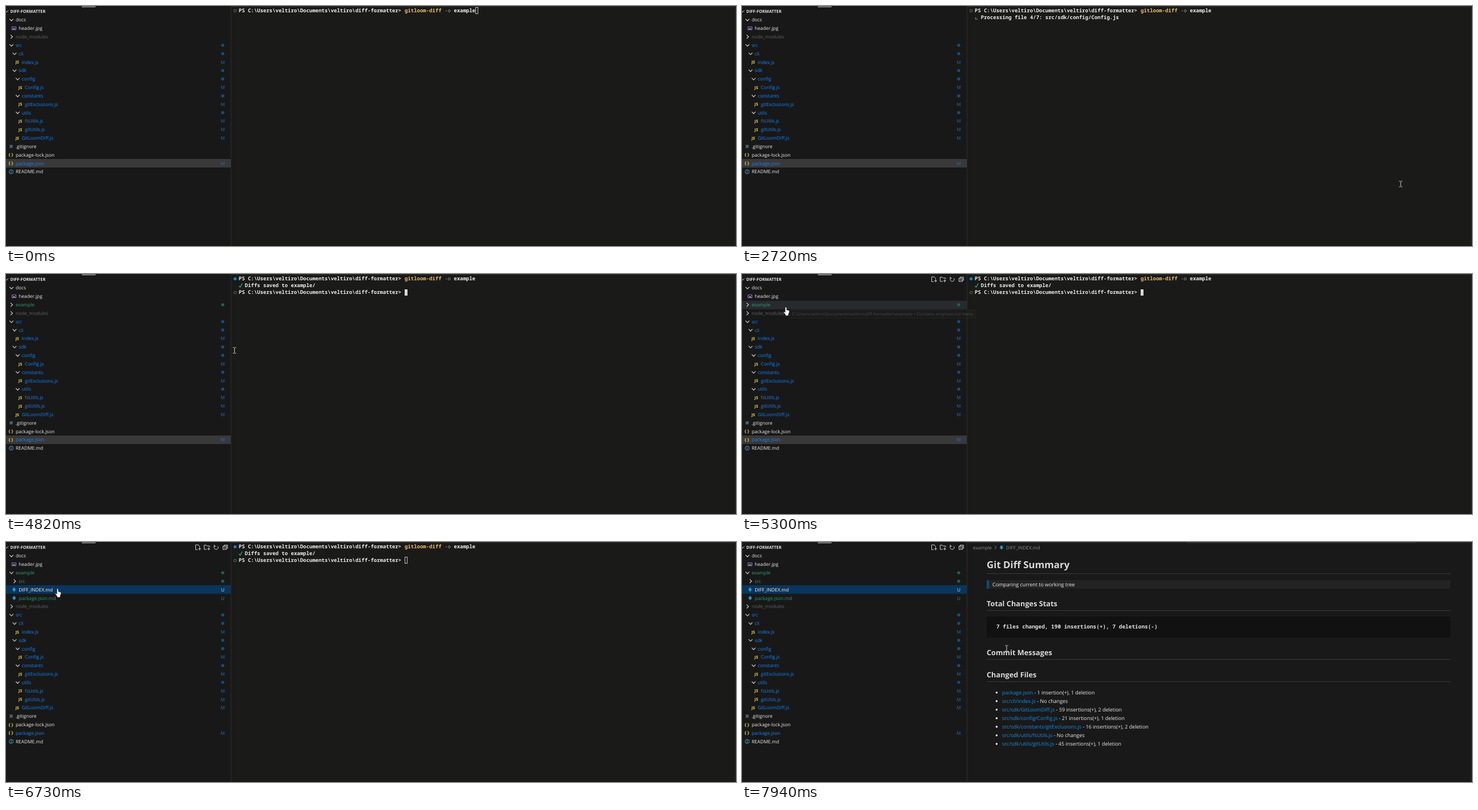
An HTML page with a canvas that plays this animation: 1280 by 422 pixels, repeating every 8 s.

```html
<!DOCTYPE html>
<html lang="en">
<head>
<meta charset="utf-8">
<title>Diff formatter demo</title>
<style>
html, body { margin: 0; width: 100%; height: 100%; overflow: hidden; background: #181818; }
canvas { display: block; }
</style>
</head>
<body>
<canvas id="stage" width="1280" height="422"></canvas>
<script>
const ctx = document.getElementById('stage').getContext('2d');
const LOOP = 8000;
const ROW = 14.83, TREE_TOP = 17, SIDE = 394;
const CELL = 5.39, TERM_X = 408;
const UI = '"Open Sans", "Noto Sans", sans-serif';
const MONO = '"Noto Sans Mono", "DejaVu Sans Mono", monospace';
const UI_SIZE = 8.3, BODY_SIZE = 8.95;
const BLUE = '#1585fa', LINK = '#1190ea', GREEN = '#2c9c78', WHITE = '#ededed', GREY = '#626262';
const HOME = 'C:\\Users\\veltiro\\Documents\\veltiro\\diff-formatter';

// Moments of the story, in ms
const T = {
  focus: 640, enter: 1910, run: 2180, folder: 2920, saved: 3060, prompt: 3130,
  tracked: 4530, tip: 5300, expand: 5440, tip2: 6590, select: 6730, open: 6810, render: 6900
};
// start, end, steps, from x, y, to x, y
const MOVES = [
  [240, 710, 7, 1213, 379, 1155, 313],
  [4320, 5100, 12, 1154, 312, 77, 58],
  [5900, 6330, 7, 78, 60, 90.5, 82],
  [7400, 7670, 5, 160, 100, 451, 172],
  [7870, 7940, 2, 457, 179, 464, 187]
];
const JOBS = [
  [2180, 'package.json'], [2330, 'src/cli/index.js'], [2530, 'src/sdk/GitLoomDiff.js'],
  [2720, 'src/sdk/config/Config.js'], [2850, 'src/sdk/constants/gitExclusions.js'],
  [2920, 'src/sdk/utils/fsUtils.js'], [2990, 'src/sdk/utils/gitUtils.js']
];
const CHANGES = [
  '1 insertion(+), 1 deletion', 'No changes', '59 insertions(+), 2 deletion',
  '21 insertions(+), 1 deletion', '16 insertions(+), 2 deletion', 'No changes',
  '45 insertions(+), 1 deletion'
];
const HAND = new Path2D('M-1.3 1Q0 -0.9 1.3 1L1.3 5 5 6Q6.4 6.6 6 9L4.6 12.4 4.4 15.3H-.6L-.9 13.4-4 9.6Q-4.1 8-2.7 8.4L-1.3 9.6Z');
const ARROW = new Path2D('M-1.9-3.6L0-2.6 1.9-3.6V-.2H3.6L0 3.7-3.6-.2H-1.9Z');

function rect(x, y, w, h, color) {
  ctx.fillStyle = color;
  ctx.fillRect(x, y, w, h);
}
function text(str, x, y, size, color, weight = 500, family = UI) {
  ctx.font = `${weight} ${size}px ${family}`;
  ctx.fillStyle = color;
  ctx.fillText(str, x, y);
  return x + ctx.measureText(str).width;
}
function line(points, color, width = 1) {
  ctx.beginPath();
  for (let i = 0; i < points.length; i += 2) ctx.lineTo(points[i], points[i + 1]);
  ctx.strokeStyle = color;
  ctx.lineWidth = width;
  ctx.stroke();
}
function disc(x, y, r, color, hollow) {
  ctx.beginPath();
  ctx.arc(x, y, r, 0, Math.PI * 2);
  ctx.lineWidth = 1;
  ctx.fillStyle = ctx.strokeStyle = color;
  if (hollow) ctx.stroke(); else ctx.fill();
}
function box(x, y, w, h, color) {
  ctx.strokeStyle = color;
  ctx.lineWidth = 1;
  ctx.strokeRect(x, y, w, h);
}
function shape(path, x, y, fill, outline) {
  ctx.save();
  ctx.translate(x, y);
  ctx.fillStyle = fill;
  ctx.fill(path);
  if (outline) {
    ctx.strokeStyle = outline;
    ctx.lineWidth = 0.7;
    ctx.stroke(path);
  }
  ctx.restore();
}

function mouseAt(t) {
  const move = MOVES.filter(m => m[0] <= t).pop();
  if (!move) return null;
  const [start, end, steps, x0, y0, x1, y1] = move;
  const k = Math.min(steps - 1, Math.floor((t - start) / (end - start) * (steps - 1) + 0.01));
  const p = k / (steps - 1), e = p * p * (3 - 2 * p);
  return { x: x0 + (x1 - x0) * e, y: y0 + (y1 - y0) * e };
}

// Each row: depth, name, kind, status
function treeRows(t) {
  const open = t >= T.expand;
  const rows = [[0, 'docs', 'open', ''], [1, 'header.jpg', 'image', '']];
  if (t >= T.folder) rows.push([0, 'example', open ? 'open' : 'shut', t >= T.tracked ? 'U' : '']);
  if (open) rows.push([1, 'src', 'shut', 'U'], [1, 'DIFF_INDEX.md', 'md', 'U'], [1, 'package.json.md', 'md', 'U']);
  rows.push(
    [0, 'node_modules', 'shut', 'ignored'],
    [0, 'src', 'open', 'M'], [1, 'cli', 'open', 'M'], [2, 'index.js', 'js', 'M'],
    [1, 'sdk', 'open', 'M'], [2, 'config', 'open', 'M'], [3, 'Config.js', 'js', 'M'],
    [2, 'constants', 'open', 'M'], [3, 'gitExclusions.js', 'js', 'M'],
    [2, 'utils', 'open', 'M'], [3, 'fsUtils.js', 'js', 'M'], [3, 'gitUtils.js', 'js', 'M'],
    [2, 'GitLoomDiff.js', 'js', 'M'], [0, '.gitignore', 'git', ''],
    [0, 'package-lock.json', 'json', ''], [0, 'package.json', 'json', 'M'], [0, 'README.md', 'info', '']
  );
  return rows;
}

function rowIcon(kind, x, y) {
  if (kind === 'open') line([x - 3.3, y - 1.6, x, y + 1.8, x + 3.3, y - 1.6], '#dcdcdc', 1.1);
  if (kind === 'shut') line([x - 1.5, y - 3.3, x + 1.9, y, x - 1.5, y + 3.3], '#dcdcdc', 1.1);
  if (kind === 'js') text('JS', x - 3.7, y + 2.7, 6.9, '#f2dc4c', 700);
  if (kind === 'json') text('{ }', x - 5, y + 2.5, 7.6, '#ead445', 700);
  if (kind === 'md') shape(ARROW, x - 0.8, y, '#259bd0');
  if (kind === 'git') rect(x - 3.2, y - 2.7, 5.4, 5.4, '#4a5d67');
  if (kind === 'image') {
    box(x - 4.5, y - 2.5, 7, 5, '#9a7cc4');
    rect(x - 3, y, 4, 2, '#ab8ad2');
  }
  if (kind === 'info') {
    disc(x - 0.5, y, 3.6, '#42a0da', true);
    rect(x - 1, y - 0.8, 1, 2.8, '#52b0e8');
    rect(x - 1, y - 2.3, 1, 1, '#52b0e8');
  }
}

function drawTree(t, mouse) {
  const rows = treeRows(t);
  const picked = t >= T.select ? 'DIFF_INDEX.md' : t >= T.expand ? 'example' : 'package.json';
  const hover = mouse && mouse.x < SIDE ? Math.floor((mouse.y - TREE_TOP) / ROW) : -1;
  rows.forEach(([depth, name, kind, status], i) => {
    const top = TREE_TOP + i * ROW, mid = top + ROW / 2;
    const active = name === picked && t >= T.expand;
    if (active) {
      rect(0, Math.round(top), SIDE, 15, '#0a355c');
      if (t < T.select) box(0.5, Math.round(top) + 0.5, SIDE - 1, 14, '#0d4577');
    } else if (name === picked) rect(0, Math.round(top), SIDE, 15, '#39393a');
    else if (i === hover) rect(0, Math.round(top), SIDE, 15, '#282a2b');

    const x = 9.6 + depth * 5.4;
    rowIcon(kind, x, mid);
    const tint = { M: BLUE, U: GREEN, ignored: GREY }[status] || WHITE;
    text(name, x + 7.3, mid + 3, UI_SIZE, active ? '#f4f4f4' : tint);
    if (status !== 'M' && status !== 'U') return;
    if (kind === 'open' || kind === 'shut') {
      disc(380, mid, 2.7, active ? '#7590bd' : status === 'M' ? '#104e88' : '#1e6450');
    } else {
      ctx.textAlign = 'center';
      text(status, 380, mid + 3, UI_SIZE, active ? '#d0dce6' : status === 'M' ? '#0f72c0' : GREEN);
      ctx.textAlign = 'left';
    }
  });
}

function drawHeader(showTools) {
  line([-1, 9, 1, 11, 4, 7.6], '#d0d0d0');
  text('DIFF-FORMATTER', 7.5, 12, 7.3, '#e4e4e4', 700);
  rect(133, 1, 24, 1, '#d8d8d8');
  if (!showTools) return;
  const c = '#d0d0d0';
  line([336, 13.5, 332.5, 13.5, 332.5, 5, 337, 5, 339.5, 7.5, 339.5, 9], c);
  line([337, 12, 342, 12], c);
  line([339.5, 9.5, 339.5, 14.5], c);
  line([352, 13, 347.5, 13, 347.5, 5.5, 351, 5.5, 352.5, 7, 357, 7, 357, 9], c);
  line([353, 12, 358, 12], c);
  line([355.5, 9.5, 355.5, 14.5], c);
  ctx.beginPath();
  ctx.arc(368.5, 9.5, 3.6, -0.6, Math.PI * 1.3);
  ctx.strokeStyle = c;
  ctx.stroke();
  line([365, 4.8, 365, 7.4, 367.8, 7.4], c);
  line([382.5, 7, 382.5, 5.5, 388.5, 5.5, 388.5, 11, 387, 11], c);
  box(380.5, 7.5, 6, 5.5, c);
  line([382, 10.3, 385, 10.3], c);
}

function term(str, col, row, color) {
  text(str, TERM_X + col * CELL, 11.2 + row * 12.1, CELL / 0.6, color, 600, MONO);
}
function prompt(row) {
  term(`PS ${HOME}>`, 0, row, WHITE);
}
function cursor(col, row, solid) {
  const x = Math.round(TERM_X + col * CELL), y = 3 + row * 12;
  if (solid) rect(x, y, 5, 11, '#d8d8d8');
  else box(x + 0.5, y - 0.5, 4, 11, '#bcbcbc');
}
function spinner(t) {
  const step = Math.floor((t - T.run) / 80);
  const ring = [[0, 0], [1, 0], [1, 1], [1, 2], [0, 2], [0, 1]];
  for (let i = 0; i < 3; i++) {
    const [cx, cy] = ring[(step + 3 + i) % 6];
    rect(409 + cx * 2.6, 17.8 + cy * 2.4, 1.3, 1.3, '#bcc4c4');
  }
}

function drawTerminal(t) {
  prompt(0);
  term('gitloom-diff', 54, 0, '#f2bc60');
  term('-o', 67, 0, '#707070');
  term('example', 70, 0, WHITE);
  if (t >= T.prompt) disc(401.7, 8.4, 2.7, '#1b7fc0');
  else disc(401.7, 8.4, 2.3, '#6c6c6c', true);

  if (t < T.enter) cursor(77, 0, t >= T.focus);
  else if (t < T.run) cursor(0, 1, true);
  else if (t < T.saved) {
    const done = JOBS.filter(j => j[0] <= t);
    spinner(t);
    term(`Processing file ${done.length}/7: ${done[done.length - 1][1]}`, 2, 1, WHITE);
  } else {
    line([408.5, 20.8, 410.6, 23.2, 414.3, 16.8], '#27c193', 1.2);
    term('Diffs saved to example/', 2, 1, WHITE);
  }
  if (t >= T.prompt) {
    prompt(2);
    disc(401.7, 32.6, 2.3, '#6c6c6c', true);
    cursor(54, 2, t < T.expand);
  }
}

function heading(str, y, size, rule) {
  text(str, 429, y, size, '#d8d8d8', 700);
  rect(429, rule, 813, 1, '#3b3b3b');
}
function drawPreview(t) {
  rect(779, 0, 403, 1.5, '#393939');
  text('example', 405, 12.5, UI_SIZE, '#8c8c8c');
  line([443, 6.8, 446, 9.6, 443, 12.4], '#8c8c8c', 0.9);
  shape(ARROW, 455, 9.6, '#259bd0');
  text('DIFF_INDEX.md', 463, 12.5, UI_SIZE, '#8c8c8c');
  if (t < T.render) return;

  heading('Git Diff Summary', 46, 16.9, 55);
  rect(429, 67, 813, 15, '#232323');
  rect(429, 67, 4, 15, '#124b77');
  text('Comparing current to working tree', 439, 77.7, BODY_SIZE, WHITE);
  heading('Total Changes Stats', 113, 12.75, 120);
  rect(429, 131, 813, 37, '#111');
  text('7 files changed, 190 insertions(+), 7 deletions(-)', 446, 152.2, 9.43, '#e4e4e4', 600, MONO);
  heading('Commit Messages', 199.4, 12.75, 206);
  heading('Changed Files', 237.8, 12.75, 245);
  JOBS.forEach(([, file], i) => {
    const y = 264.5 + i * 15.03;
    disc(446.5, y + 0.3, 1.8, '#dedede');
    const x = text(file, 456, y + 3.2, BODY_SIZE, LINK);
    text(' - ' + CHANGES[i], x, y + 3.2, BODY_SIZE, WHITE);
  });
}

function tooltip(str, x, y, alpha) {
  ctx.save();
  ctx.globalAlpha = alpha;
  ctx.font = `400 7.75px ${UI}`;
  const w = ctx.measureText(str).width + 9;
  rect(x, y, w, 15, '#202020');
  box(x + 0.5, y + 0.5, w - 1, 14, '#404040');
  text(str, x + 4.5, y + 10.2, 7.75, '#d0d0d0', 400);
  ctx.restore();
}
function drawTooltips(t) {
  if (t >= T.tip && t < T.expand) {
    tooltip(HOME + '\\example • Contains emphasized items', 83, 63, t < T.tip + 70 ? 0.25 : 1);
  }
  if (t >= T.tip2 && t < T.select) {
    tooltip(HOME + '\\example\\DIFF_INDEX.md • Untracked', 96, 93, t < T.tip2 + 70 ? 0.25 : 1);
  }
}

function drawMouse({ x, y }) {
  if (x < SIDE) return shape(HAND, x, y, '#fff', '#222');
  const c = '#d2d2d2';
  line([x, y - 5, x, y + 5], c);
  for (const end of [y - 5, y + 5]) {
    line([x - 2.8, end, x - 0.8, end], c);
    line([x + 0.8, end, x + 2.8, end], c);
  }
}

function draw(t) {
  ctx.textRendering = 'geometricPrecision';
  const mouse = mouseAt(t);
  rect(0, 0, 1280, 422, '#181818');
  rect(SIDE, 0, 886, 422, t >= T.open ? '#191919' : '#1a1a18');
  rect(SIDE, 0, 886, 1.5, '#2a2a2a');
  rect(SIDE, 0, 1, 422, '#2b2b2b');
  drawTree(t, mouse);
  rect(1278, 2, 1, 420, '#292929');
  drawHeader(t >= T.tip || (t >= 4320 && mouse.x < SIDE));
  if (t < T.open) drawTerminal(t); else drawPreview(t);
  drawTooltips(t);
  if (mouse) drawMouse(mouse);
}

function tick() {
  draw(performance.now() % LOOP);
  requestAnimationFrame(tick);
}
tick();
</script>
</body>
</html>
```
